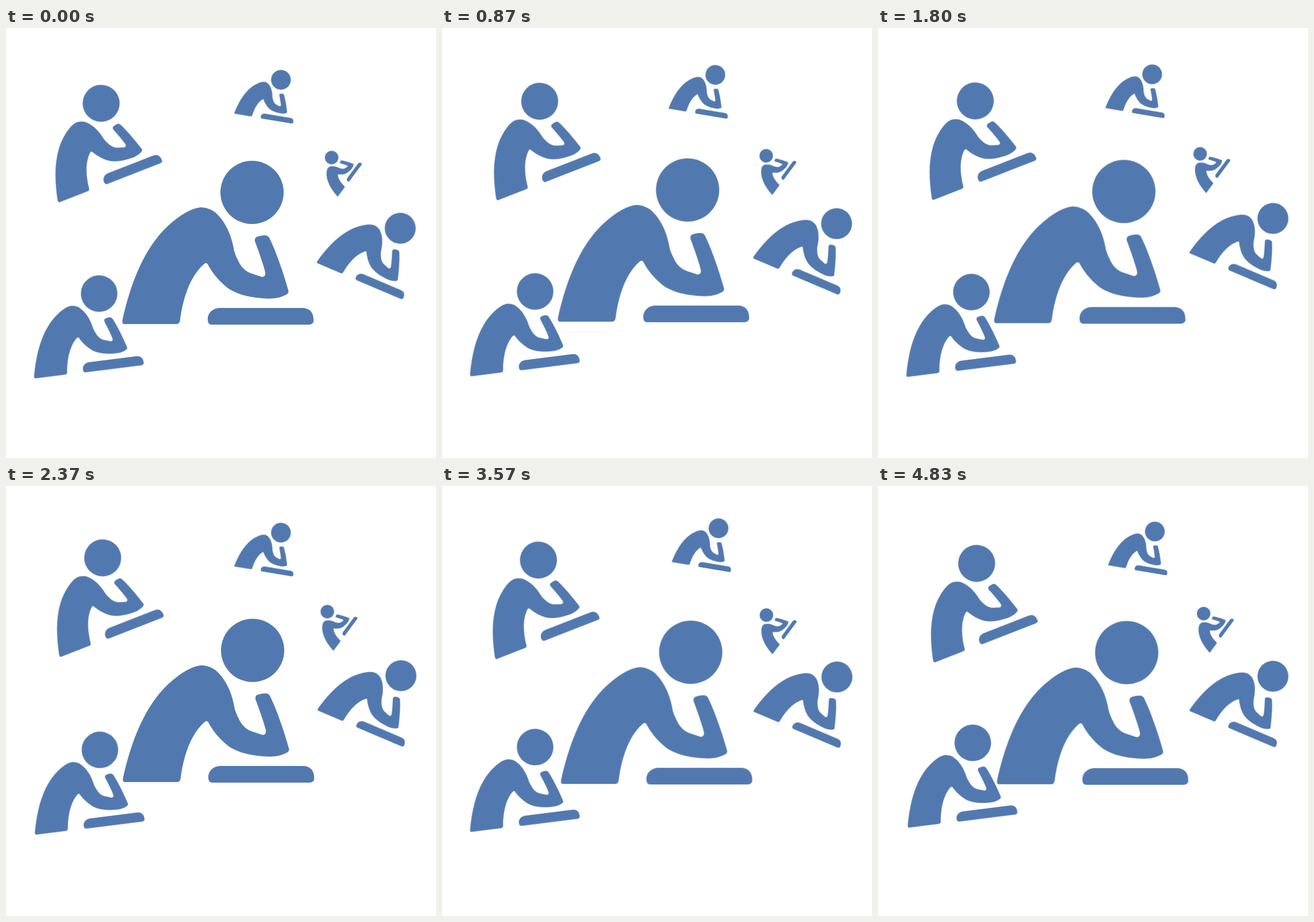
Write an HTML page that moves like this. It is 748 by 748 pixels and loops after 5.01 s.

```html
<!DOCTYPE html>
<html lang="en">
<head>
<meta charset="utf-8">
<title>Drifting thinkers</title>
<style>
  html, body { margin: 0; width: 100%; height: 100%; overflow: hidden; background: #fff; }
  svg { display: block; width: 100vw; height: 100vh; fill: #5279af; }

  .drift { animation: 5010ms ease-in-out infinite; }
  .large { animation-name: large; }
  .upper { animation-name: upper; }
  .small { animation-name: small; }
  .tiny  { animation-name: tiny; }
  .right { animation-name: right; }
  .lower { animation-name: lower; }

  /* Each figure is positioned by the centre of its head. */
  @keyframes large {
    0%    { transform: translate(428px, 286px); }
    9.4%  { transform: translate(428px, 280.6px); }
    25.3% { transform: translate(426.5px, 283px); }
    47.3% { transform: translate(429px, 286px); }
    62.5% { transform: translate(432px, 275px); }
    71.3% { transform: translate(432.6px, 289.2px); }
    96.4%, 100% { transform: translate(432.6px, 289.8px); }
  }
  @keyframes upper {
    0%    { transform: translate(165.5px, 131px); }
    9.4%  { transform: translate(169.6px, 126.3px); }
    25.3% { transform: translate(170.2px, 128.5px); }
    47.3% { transform: translate(168.2px, 125px); }
    62.5% { transform: translate(168.2px, 136px); }
    71.3% { transform: translate(167.8px, 128.8px); }
    85.8% { transform: translate(170px, 132px); }
    96.4%, 100% { transform: translate(171.6px, 134.6px); }
  }
  @keyframes small {
    0%    { transform: translate(478.3px, 90.2px); }
    9.4%  { transform: translate(475.5px, 80px); }
    25.3% { transform: translate(475.5px, 83.2px); }
    38%   { transform: translate(477px, 80.5px); }
    47.3% { transform: translate(478.3px, 81.2px); }
    62.5% { transform: translate(478.5px, 82px); }
    71.3% { transform: translate(481px, 73.6px); }
    75%   { transform: translate(481px, 74px); }
    85%, 100% { transform: translate(481.6px, 79.2px); }
  }
  @keyframes tiny {
    0%, 9.4% { transform: translate(566.5px, 225.4px); }
    25.3% { transform: translate(561.6px, 219.3px); }
    47.3% { transform: translate(559px, 218.6px); }
    62.5% { transform: translate(564.4px, 222.4px); }
    71.3% { transform: translate(564.4px, 224.6px); }
    96.4%, 100% { transform: translate(566.5px, 222px); }
  }
  @keyframes right {
    0%, 9.4% { transform: translate(685.8px, 348.4px); }
    25.3% { transform: translate(687px, 332.5px); }
    47.3%, 62.5% { transform: translate(687px, 330px); }
    71.3% { transform: translate(687px, 332.2px); }
    96.4%, 100% { transform: translate(687px, 331px); }
  }
  @keyframes lower {
    0%, 9.4% { transform: translate(162px, 462px); }
    12%   { transform: translate(162px, 462.8px); }
    25.3% { transform: translate(162px, 449.7px); }
    39.5% { transform: translate(162.6px, 460.8px); }
    47.3% { transform: translate(163.4px, 459px); }
    54%   { transform: translate(162px, 451px); }
    62.5% { transform: translate(162px, 449.5px); }
    71.3% { transform: translate(162px, 454.2px); }
    85.8% { transform: translate(164.4px, 447.4px); }
    96.4%, 100% { transform: translate(164.9px, 446.8px); }
  }
</style>
</head>
<body>
<svg viewBox="0 0 748 748">
  <defs>
    <g id="thinker" transform="translate(-428 -286)">
      <circle cx="428" cy="286" r="55"/>
      <path d="M205 515Q201 514 203 506C214 457 232 404 262 366C282 340 317 312 341 312
        C351 313 357 316 363 320C382 336 392 361 396 383C397 391 401 399 406 409
        C411 418 418 424 427 427L445 433Q452 433 451 425C447 409 440 390 433 371
        Q432 365 437 363Q447 360 453 361Q457 362 459 367C470 390 482 424 491 456
        Q493 461 487 464C472 472 459 471 444 470C420 468 398 462 384 451
        C368 438 357 423 351 411Q348 407 344 411C318 434 307 476 303 507Q302 515 297 515Z"/>
      <path d="M357 516Q351 515 351 508C350 496 360 487 372 487H513C527 486 535 494 535 507Q536 515 528 516Z"/>
    </g>
  </defs>
  <g class="drift large"><use href="#thinker"/></g>
  <g class="drift upper"><use href="#thinker" transform="rotate(-21.3) scale(.585)"/></g>
  <g class="drift small"><use href="#thinker" transform="rotate(9.5) scale(.312)"/></g>
  <g class="drift tiny"><use href="#thinker" transform="rotate(-53.5) scale(.214)"/></g>
  <g class="drift right"><use href="#thinker" transform="rotate(23) scale(.49)"/></g>
  <g class="drift lower"><use href="#thinker" transform="rotate(-7.2) scale(.578)"/></g>
</svg>
</body>
</html>
```
